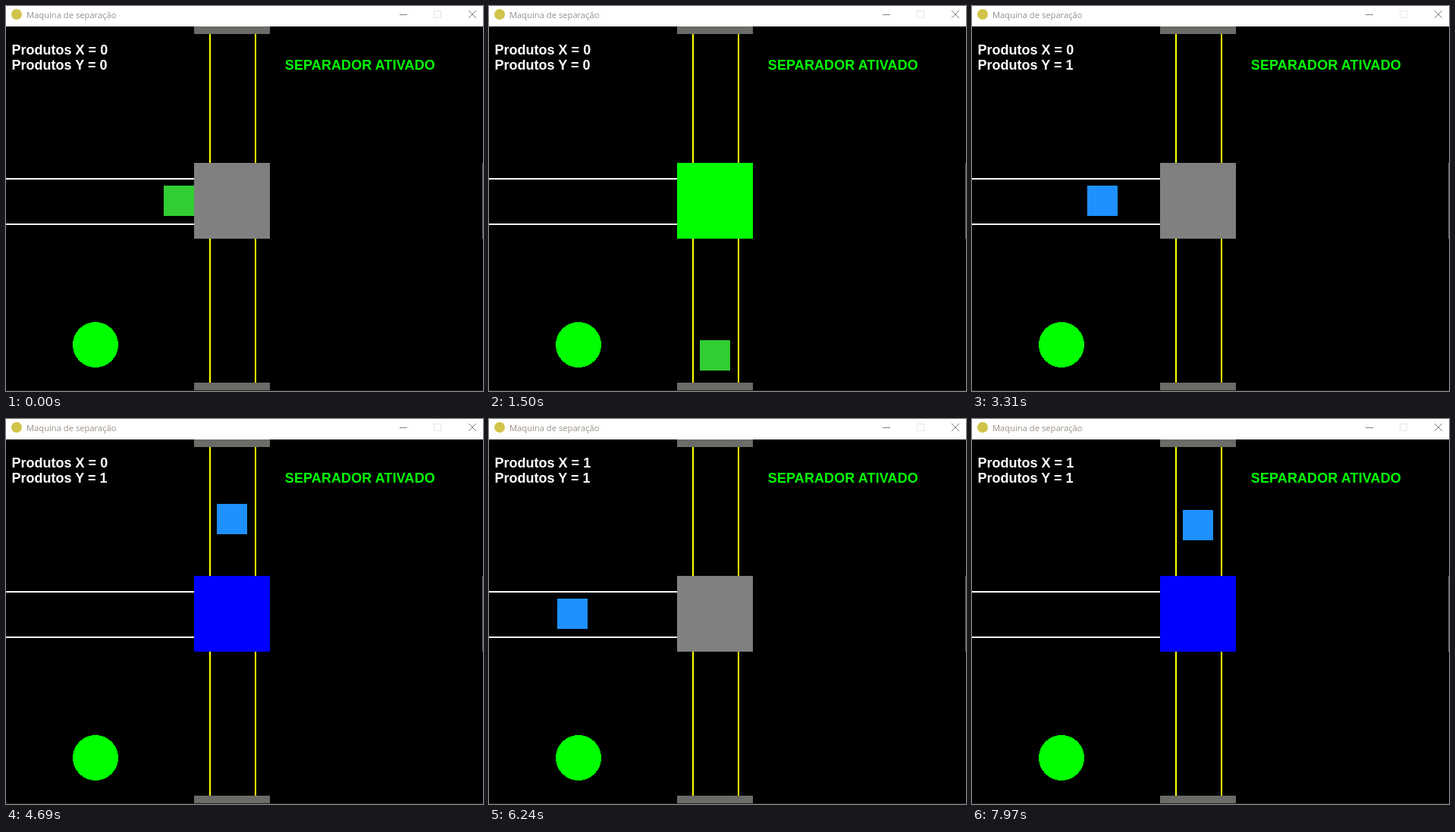
Animation of 629 by 508 pixels, one loop 8000 ms. Source, as an HTML page:

```html
<!DOCTYPE html>
<html lang="pt">
<head>
<meta charset="utf-8">
<title>Maquina de separação</title>
<style>
  html, body { margin: 0; width: 100%; height: 100%; overflow: hidden; background: #000; }
  svg { display: block; width: 629px; height: 508px; }
  .label { font: bold 18px "Liberation Sans", Arial, sans-serif; fill: #fff; }
  .status { letter-spacing: .1px; fill: #0f0; }
  .title { font: 11.2px "Open Sans", "Noto Sans", sans-serif; fill: #999088; }
  .belt { fill: none; stroke-width: 2; }
</style>
</head>
<body>
<svg viewBox="0 0 629 508">
  <rect width="629" height="508"/>
  <path class="belt" stroke="#fff" d="M0 228H248M0 288H248"/>
  <path class="belt" stroke="#ff0" d="M269 37V497M329 37V497"/>
  <rect id="item" width="40" height="40"/>
  <rect id="gate" x="248" y="207" width="100" height="100"/>
  <path fill="#6b6b68" d="M248 27h100v10h-100zM248 497h100v10h-100z"/>
  <path fill="#606060" d="M628 207h1v100h-1z"/>
  <circle cx="118" cy="447" r="30" fill="#0f0" shape-rendering="crispEdges"/>

  <text class="label" x="7.6" y="64">Produtos X = <tspan id="countX">0</tspan></text>
  <text class="label" x="7.6" y="84">Produtos Y = <tspan id="countY">0</tspan></text>
  <text class="label status" x="367.8" y="84">SEPARADOR ATIVADO</text>

  <rect y="507" width="629" height="1" fill="#241c22"/>
  <rect width="629" height="27" fill="#fff"/>
  <circle cx="14" cy="11" r="7" fill="#d2c44a"/>
  <text class="title" x="27" y="16">Maquina de separação</text>
  <g fill="none" stroke="#808080">
    <path d="M519 11.5h10"/>
    <rect x="564.5" y="6.5" width="9" height="9" stroke="#e6e6e6"/>
    <path d="M610 6l10 10M620 6l-10 10"/>
  </g>
</svg>
<script>
const LOOP = 8000, TICK = 69.55;               // ms
const SPAWN_X = -50, TURN_X = 278, BELT_Y = 237;
const SPEED = 0.161;                           // px per ms along the entry belt
const TRAVEL = (TURN_X - SPAWN_X) / SPEED;

const $ = id => document.getElementById(id);
const item = $('item'), gate = $('gate'), countX = $('countX'), countY = $('countY');

// lift: speed after the turn, in px per ms; positive goes down.
const green = { fill: '#32cd32', gate: '#0f0', lift: 0.1916 };
const blue = { fill: '#1e90ff', gate: '#00f', lift: -0.205 };
const queue = [
  { kind: green, spawn: -1602 },
  { kind: blue, spawn: 2055 },
  { kind: blue, spawn: 5360 }
];

// The screen refreshes once per tick.
const snap = t => Math.max(0, (Math.floor(t / TICK - 0.42) + 0.59) * TICK);

function draw(now) {
  const t = snap(now % LOOP);
  const spawned = queue.filter(p => p.spawn <= t);
  const { kind, spawn } = spawned.pop();
  const age = t - spawn;
  const turned = age >= TRAVEL;

  item.setAttribute('x', Math.round(Math.min(TURN_X, SPAWN_X + SPEED * age)));
  item.setAttribute('y', Math.round(BELT_Y + kind.lift * Math.max(0, age - TRAVEL)));
  item.setAttribute('fill', kind.fill);
  gate.setAttribute('fill', turned ? kind.gate : '#808080');
  countX.textContent = spawned.filter(p => p.kind === blue).length;
  countY.textContent = spawned.filter(p => p.kind === green).length;
}

const start = performance.now();
function loop() {
  draw(performance.now() - start);
  requestAnimationFrame(loop);
}
loop();
</script>
</body>
</html>
```
